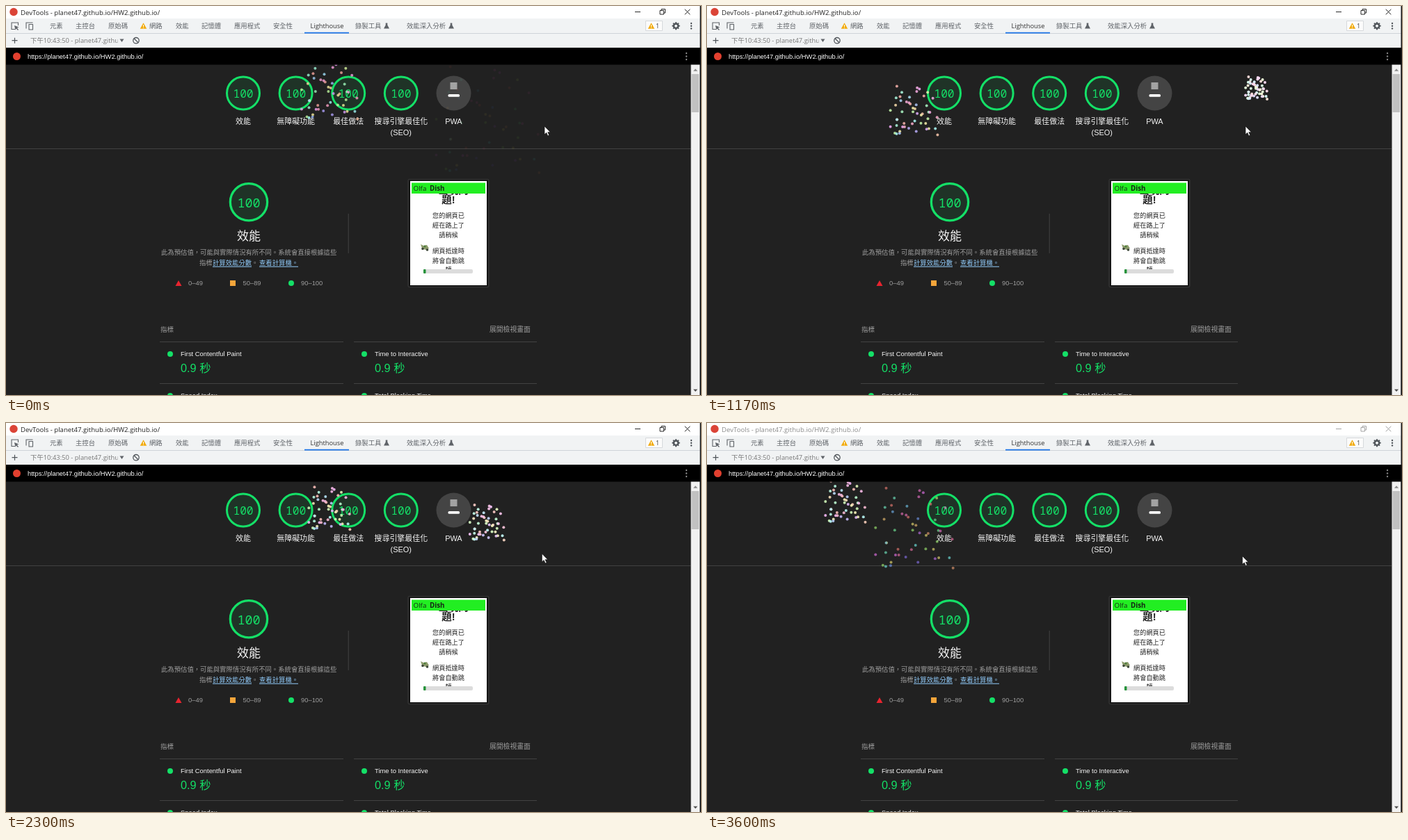
An HTML page with a canvas that plays this animation: 999 by 560 pixels, repeating every 3.63 s.

```html
<!DOCTYPE html>
<html lang="zh-Hant">
<head>
<meta charset="utf-8">
<title>Audit report</title>
<style>
html, body { margin: 0; width: 100%; height: 100%; overflow: hidden; background: #212121; }
canvas { display: block; width: 999px; height: 560px; }
</style>
</head>
<body>
<canvas id="stage" width="999" height="560"></canvas>
<script>
const ctx = document.getElementById('stage').getContext('2d');
const LOOP = 3630, FRAME = 1000 / 30;
const ARIAL = '"Liberation Sans", "Noto Sans CJK TC", sans-serif';
const UI = '"Open Sans", "Noto Sans CJK TC", sans-serif';
const MONO = '"Noto Sans Mono", monospace';
const GREEN = '#14e067', GREY = '#9e9e9e', LIGHT = '#f5f5f5', RULE = '#424242';
const HOST = 'planet47.github.io/HW2.github.io/';

// y is the vertical centre of the glyphs
function text(str, x, y, size, color, { font = ARIAL, weight = 400, align = 'left' } = {}) {
  ctx.font = `${weight} ${size}px ${font}`;
  ctx.fillStyle = color;
  ctx.textAlign = align;
  ctx.fillText(str, x, y + size * 0.37);
}

function rect(x, y, w, h, color, radius = 0) {
  ctx.fillStyle = color;
  ctx.beginPath();
  ctx.roundRect(x, y, w, h, radius);
  ctx.fill();
}

function disc(x, y, r, color) {
  ctx.fillStyle = color;
  ctx.beginPath();
  ctx.arc(x, y, r, 0, 7);
  ctx.fill();
}

function ring(x, y, r, width, color) {
  ctx.strokeStyle = color;
  ctx.lineWidth = width;
  ctx.beginPath();
  ctx.arc(x, y, r, 0, 7);
  ctx.stroke();
}

function poly(points, color) {
  ctx.fillStyle = color;
  ctx.beginPath();
  points.forEach(([x, y]) => ctx.lineTo(x, y));
  ctx.fill();
}

function stroke(color, width, path) {
  ctx.strokeStyle = color;
  ctx.lineWidth = width;
  ctx.stroke(new Path2D(path));
}

function clipped(x, y, w, h, draw) {
  ctx.save();
  ctx.beginPath();
  ctx.rect(x, y, w, h);
  ctx.clip();
  draw();
  ctx.restore();
}

const triangle = (x, y, w, h, color) => poly([[x, y - h / 2], [x + w / 2, y + h / 2], [x - w / 2, y + h / 2]], color);
const kebab = (x, y, gap, color) => [-gap, 0, gap].forEach(d => disc(x, y + d, 1.2, color));

function warning(x, y) {
  triangle(x, y, 9.5, 8.5, '#f2ab0c');
  rect(x - 0.5, y - 1.5, 1, 3, '#fff');
  rect(x - 0.5, y + 2.2, 1, 1, '#fff');
}

function flask(x, y) {
  poly([[x - 1.3, y - 4], [x + 1.3, y - 4], [x + 1.3, y - 1], [x + 4, y + 4], [x - 4, y + 4], [x - 1.3, y - 1]], '#5f6368');
}

function drawTitleBar(active) {
  const ink = active ? '#111' : '#9a9a9a';
  rect(0, 0, 999, 18, '#fff');
  disc(11, 8.5, 5.7, '#db4437');
  text('DevTools - ' + HOST, 21, 9, 9.6, active ? '#222' : '#8c8c8c', { font: UI });
  stroke(ink, 0.9, 'M904 8.5h8M940 6.5h5.5v5.5h-5.5zM942 6v-1.5h5.5v5.5h-1.5M975.7 4.7l7.6 7.6M983.3 4.7l-7.6 7.6');
}

const TABS = [['元素', 63], ['主控台', 100], ['原始碼', 147], ['網路', 206], ['效能', 244], ['記憶體', 281],
  ['應用程式', 328], ['安全性', 384], ['錄製工具', 502], ['效能深入分析', 576]];

function drawToolbars() {
  rect(0, 18, 999, 42, '#f1f3f4');
  rect(0, 39, 999, 1, '#cfd3d8');
  stroke('#5f6368', 1.1, 'M13 33.500h-5v-9.500h9.500v4M29 32.500v-8.500h9.500M33 26.500h5.500v7.500h-5.500z');
  poly([[12, 28], [18.5, 30.5], [15.8, 31.5], [18, 34], [17, 35], [14.7, 32.4], [13.5, 34.5]], '#5f6368');
  TABS.forEach(([label, x]) => text(label, x, 28.7, 9.35, '#5f6368', { font: UI }));
  text('Lighthouse', 437.5, 28.7, 9.3, '#333', { font: UI });
  rect(429, 37.8, 64, 1.7, '#1a73e8');
  warning(197.5, 28.5);
  flask(547, 28.5);
  flask(640, 28.5);

  rect(919.5, 21.5, 24, 14, '#fbfbfb', 2);
  stroke('#d6d9dc', 1, 'M919.5 21.5h24v14h-24z');
  warning(927.5, 28.5);
  text('1', 934, 28.7, 9, '#444', { font: UI });
  ring(963, 28.7, 3.2, 2.4, '#50555a');
  for (let i = 0; i < 8; i++) {
    const a = i * Math.PI / 4;
    disc(963 + 4.7 * Math.cos(a), 28.7 + 4.7 * Math.sin(a), 1.1, '#50555a');
  }
  kebab(985, 28.7, 3.7, '#50555a');

  stroke('#50555a', 1.2, 'M8.500 49.700h8M12.500 45.700v8');
  clipped(30, 41, 130.5, 19, () => text('下午10:43:50 - ' + HOST, 35, 50, 9.4, '#777', { font: UI }));
  poly([[163.5, 47.5], [169.5, 47.5], [166.5, 52]], '#5f6368');
  ring(187, 49.7, 4.2, 1.3, '#50555a');
  stroke('#50555a', 1.3, 'M184 46.700l6 6');

  rect(0, 60, 999, 24.5, '#000');
  disc(15.5, 72.5, 5.5, '#e2402f');
  text('https://' + HOST, 31, 72.3, 9.4, '#fff');
  kebab(978, 72.5, 4.5, '#808080');
}

function gauge(x, y, r, width, size) {
  disc(x, y, r, '#1f3327');
  ring(x, y, r - width / 2, width, GREEN);
  text('100', x, y + 0.5, size, GREEN, { font: MONO, align: 'center' });
}

function drawScores() {
  const labels = ['效能', '無障礙功能', '最佳做法', '搜尋引擎最佳化', 'PWA'];
  labels.forEach((label, i) => {
    const x = 341 + i * 75.6;
    if (i < 4) gauge(x, 125.5, 25, 3, 16.2);
    text(label, x, 166, 10.95, LIGHT, { align: 'center' });
  });
  text('(SEO)', 567.8, 182, 10.95, LIGHT, { align: 'center' });
  disc(643.5, 125.5, 25, '#444');
  rect(638.5, 110, 10, 10, '#a3a3a3');
  rect(635.5, 127, 16.5, 3.8, '#fff', 1.5);
  rect(0, 205, 984, 1, RULE);
}

function drawPerformance() {
  gauge(349, 282.3, 28.3, 3.3, 18.4);
  text('效能', 349, 331, 17, LIGHT, { align: 'center' });
  text('此為預估值，可能與實際情況有所不同。系統會直接根據這些', 223, 355, 9.35, GREY);
  const links = [['指標', 278, 0], ['計算效能分數', 297, 56], ['。', 353, 0], ['查看計算機。', 364, 56]];
  links.forEach(([str, x, underline]) => {
    text(str, x, 370, 9.35, underline ? '#90caf9' : GREY);
    if (underline) rect(x, 374.8, underline, 0.9, '#90caf9');
  });
  triangle(248, 399, 9, 8, '#e8242f');
  rect(322, 395, 8, 8, '#f5a53a');
  disc(410, 399, 4, GREEN);
  [['0–49', 262], ['50–89', 340.5], ['90–100', 424]].forEach(([str, x]) => text(str, x, 399, 9.4, GREY));
  rect(491.7, 299, 1, 57, RULE);
}

function drawThumbnail() {
  rect(577.5, 249, 117, 156, '#383838', 2);
  rect(578.7, 250, 114.500, 154, '#161616', 1);
  rect(581, 252, 110, 150, '#fff');
  const line = (str, y, size = 9.2, weight = 500, x = 636) => text(str, x, y, size, '#222', { weight, align: 'center' });
  clipped(581, 270, 110, 20, () => line('出現問', 265, 14.5, 700, 643));
  rect(583, 254.5, 106, 15.5, '#22ee22');
  text('Olfa', 585.5, 262, 9.8, '#142814', { font: UI });
  text('Dish', 609, 262, 9.8, '#142814', { font: UI, weight: 700 });
  line('題!', 279, 14.5, 700);
  line('您的網頁已', 302);
  line('經在路上了', 316);
  line('請稍候', 330);
  line('網頁抵達時', 353);
  line('將會自動跳', 367);
  clipped(581, 372, 110, 7, () => line('轉', 380));
  rect(600, 379, 71, 6, '#dcdcdc', 2);
  rect(600, 379, 3.5, 6, '#25933b', 1);
  poly([[596, 343], [600, 345], [605, 344], [608, 349], [603, 351], [598, 349]], '#8d9b6c');
  disc(599, 349.5, 1.8, '#3c4638');
  disc(605.5, 351, 1.8, '#3c4638');
  disc(602, 346, 1.5, '#4b7d3a');
}

function drawMetrics() {
  text('指標', 222, 465.3, 9.5, GREY);
  text('展開檢視畫面', 695, 465.3, 9.8, GREY);
  const columns = [[221, 264, 'First Contentful Paint', 'Speed Index'], [500, 263, 'Time to Interactive', 'Total Blocking Time']];
  columns.forEach(([x, width, first, second]) => {
    rect(x, 483, width, 1, RULE);
    rect(x, 543, width, 1, RULE);
    disc(x + 15, 501, 4, GREEN);
    text(first, x + 30, 500.7, 9.4, LIGHT);
    text('0.9 秒', x + 30, 520.7, 16.3, GREEN);
    disc(x + 15, 561, 4, GREEN);
    text(second, x + 30, 560.8, 9.4, LIGHT);
  });
}

function drawScrollbar() {
  rect(984.5, 84.5, 13, 476, '#f1f1f1');
  rect(985.5, 98, 10.5, 55, '#c1c1c1');
  triangle(991, 92, 6, 3.5, '#8a8a8a');
  triangle(991, 553.5, 6, -3.5, '#505050');
  rect(997.5, 0, 1.5, 560, '#161616');
}

function drawCursor(t) {
  const p = Math.min(1, Math.max(0, (t - 2170) / 160));
  ctx.save();
  ctx.translate(774 - 4.5 * p, 173 + 18.5 * p);
  const arrow = new Path2D('M0 0v12l2.800-2.600 2 4.500 2-.9-2-4.300h3.700z');
  ctx.fillStyle = '#fff';
  ctx.fill(arrow);
  ctx.strokeStyle = '#111';
  ctx.lineWidth = 0.7;
  ctx.stroke(arrow);
  ctx.restore();
}

// Spark end offsets as x, y pairs, grouped by hue
const SPARKS = {
  5: [42, -124, -38, -13, -13, -92, -67, -163, -54, -121],
  21: [36, -52, 97, 33],
  38: [-72, -87, 6, -72],
  54: [-2, -75, 62, 8, -66, -29, 31, -47, -55, 19, 49, -13],
  80: [57, -139],
  98: [58, -32, -93, -66, 30, -14, -2, -60, -75, 26],
  140: [53, -85, 61, -59, -46, -60],
  160: [-70, -116, -47, -139, -68, -5],
  178: [5, -23, -68, 29, 88, 8],
  197: [-16, -119, -67, -29],
  208: [-51, -105],
  221: [-56, 27, 11, -88],
  250: [-19, 6, 11, 19],
  278: [15, -53, 53, 10],
  298: [24, -152, -93, 0, -44, 1],
  316: [13, -142, 66, -58, 78, -115, 15, -157],
  324: [-28, -100, -18, -97],
  335: [-36, 1, -5, -12, 95, -38],
};
const SCALE = 0.78, FALL = 80 * SCALE;
// Burst sites in percent of the page width: left, top
const SITES = [[47, 4], [30, 7], [70, 6], [20, 3], [80, 3]];
const EMITTERS = [{ start: -965, period: 1000, site: 2 }, { start: -470, period: 1250, site: 0 }];

// cubic-bezier(0, 0, .58, 1)
function easeOut(x) {
  let lo = 0, hi = 1;
  for (let i = 0; i < 20; i++) {
    const u = (lo + hi) / 2;
    if (1.74 * u * u - 0.74 * u ** 3 < x) lo = u; else hi = u;
  }
  return lo * lo * (3 - 2 * lo);
}
const easeIn = x => 1 - easeOut(1 - x);

function drawBurst(t, { start, period, site }) {
  const age = (t - start) / period, round = Math.floor(age);
  const spread = easeOut(age - round), fall = easeIn(age - round);
  const [left, top] = SITES[(site + round) % SITES.length];
  const x = 1.3 + 9.85 * left, y = 98 + 9.6 * top + FALL * fall;
  ctx.globalAlpha = 1 - fall;
  for (const [hue, offsets] of Object.entries(SPARKS)) {
    const color = `hsl(${hue} ${80}% ${100 - 40 * spread}%)`;
    for (let i = 0; i < offsets.length; i += 2) {
      disc(x + offsets[i] * SCALE * spread, y + offsets[i + 1] * SCALE * spread, 2, color);
    }
  }
  ctx.globalAlpha = 1;
}

function draw(time) {
  const t = Math.floor((time % LOOP + 3.4) / FRAME) * FRAME;
  rect(0, 0, 999, 560, '#212121');
  drawScores();
  drawPerformance();
  drawThumbnail();
  drawMetrics();
  clipped(0, 84.5, 984, 476, () => EMITTERS.forEach(e => drawBurst(t, e)));
  drawTitleBar(t < 3450);
  drawToolbars();
  drawScrollbar();
  drawCursor(t);
}

const begin = performance.now();
function tick() {
  draw(performance.now() - begin);
  requestAnimationFrame(tick);
}
tick();
</script>
</body>
</html>
```
